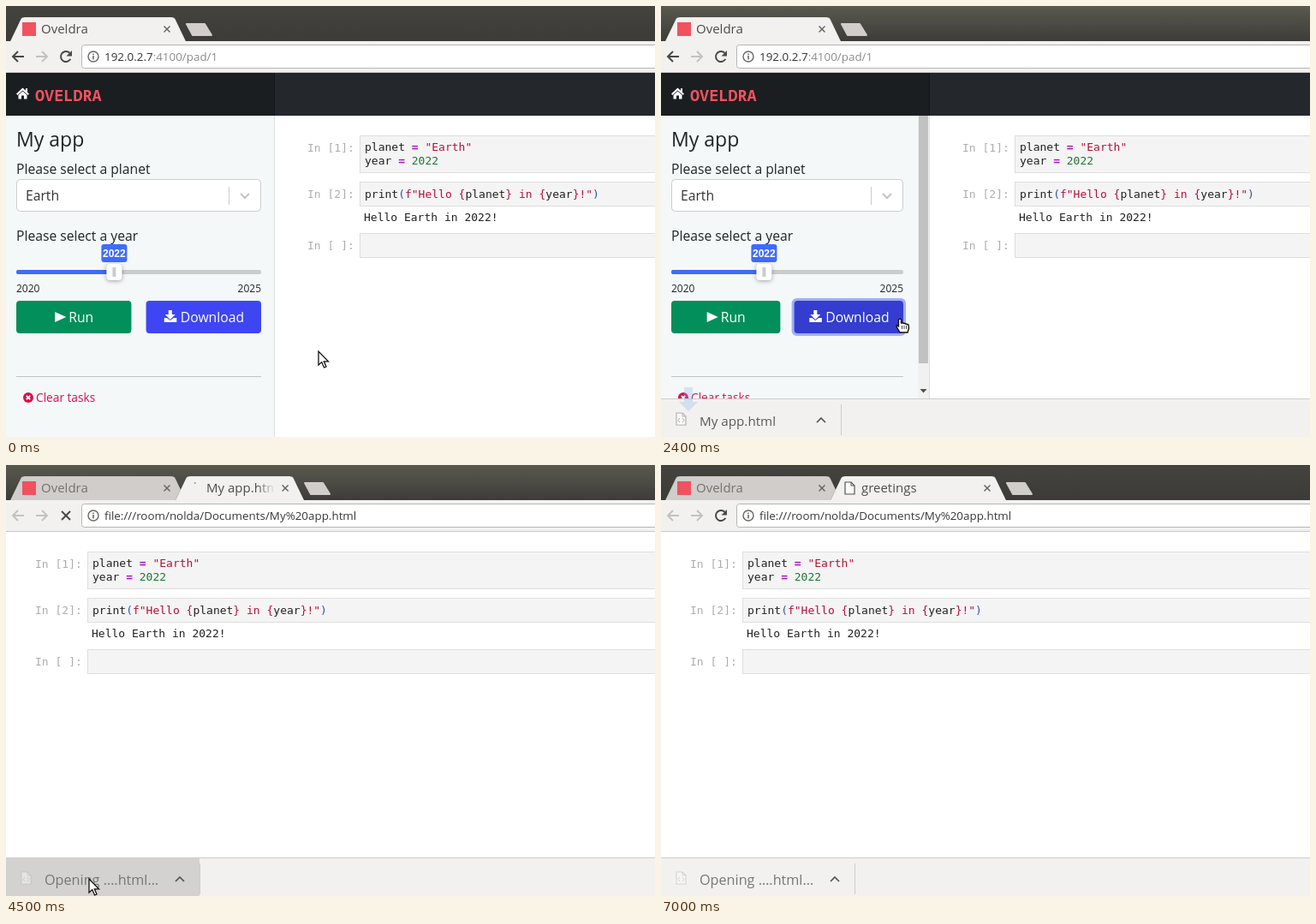
An HTML page with a canvas for the animation above (7.1 s loop, 758 by 503 pixels).

```html
<!DOCTYPE html>
<html lang="en">
<head>
<meta charset="utf-8">
<title>Notebook download</title>
<style>
html, body { margin: 0; width: 100%; height: 100%; overflow: hidden; }
canvas { display: block; }
</style>
</head>
<body>
<canvas id="stage" width="758" height="503"></canvas>
<script>
const c = document.getElementById('stage').getContext('2d');
const W = 758, H = 503, LOOP = 7100;
const SANS = '"Open Sans", "Noto Sans", sans-serif';
const MONO = '"DejaVu Sans Mono", monospace';
const INK = '#212529', BAR = '#f2f1f0', BLUE = '#3f6bfd', RED = '#f0525f';

// Keys are [time, ...values]
const POINTER = [
  [300, 365, 403], [600, 331, 388], [900, 285, 363], [1000, 285, 363], [1100, 279, 365],
  [2400, 279, 365], [3100, 205, 402], [3900, 97, 483], [4700, 97, 483], [5000, 190, 478],
  [5100, 190, 478], [5200, 250, 440], [5400, 339, 350], [5600, 120, 330], [5700, 8, 280],
  [5800, 65, 220], [5900, 60, 137], [6000, 52, 84], [6100, 45, 30]
];
const CHIP_SHADE = [[3900, 0], [4100, .075], [4200, .13], [4500, .13], [4700, 0]];

const clamp = v => Math.max(0, Math.min(1, v));
const easeOut = p => 1 - (1 - clamp(p)) ** 2;
const mix = (a, b, p) => a + (b - a) * p;

function track(keys, t) {
  const i = keys.findIndex(k => k[0] >= t);
  if (i === 0) return keys[0].slice(1);
  if (i < 0) return keys[keys.length - 1].slice(1);
  const [a, b] = [keys[i - 1], keys[i]];
  const p = (t - a[0]) / (b[0] - a[0]);
  return a.slice(1).map((v, j) => mix(v, b[j + 1], p));
}

function rect(x, y, w, h, fill) {
  c.fillStyle = fill;
  c.fillRect(x, y, w, h);
}

function round(x, y, w, h, r, fill, stroke, width = 1) {
  c.beginPath();
  c.roundRect(x, y, w, h, r);
  paint(fill, stroke, width);
}

function circle(x, y, r, fill, stroke, width = 1) {
  c.beginPath();
  c.arc(x, y, r, 0, 7);
  paint(fill, stroke, width);
}

function paint(fill, stroke, width = 1) {
  if (fill) { c.fillStyle = fill; c.fill(); }
  if (stroke) { c.strokeStyle = stroke; c.lineWidth = width; c.stroke(); }
}

function poly(pts, fill, stroke, width = 1, open = false) {
  c.beginPath();
  for (let i = 0; i < pts.length; i += 2) c.lineTo(pts[i], pts[i + 1]);
  if (!open) c.closePath();
  paint(fill, stroke, width);
}

function text(s, x, y, size, color = INK, family = SANS, weight = 400) {
  c.font = `${weight} ${size}px ${family}`;
  c.fillStyle = color;
  c.fillText(s, x, y);
  return x + c.measureText(s).width;
}

function at(x, y, draw) {
  c.save();
  c.translate(x, y);
  draw();
  c.restore();
}

function clip(x, y, w, h, draw) {
  c.save();
  c.beginPath();
  c.rect(x, y, w, h);
  c.clip();
  draw();
  c.restore();
}

function vertical(y0, y1, top, bottom) {
  const g = c.createLinearGradient(0, y0, 0, y1);
  g.addColorStop(0, top);
  g.addColorStop(1, bottom);
  return g;
}

function cross(x, y, r, color, width) {
  poly([x - r, y - r, x + r, y + r], null, color, width, true);
  poly([x - r, y + r, x + r, y - r], null, color, width, true);
}

function page(x, y, color) {
  poly([x, y, x + 7, y, x + 11, y + 4, x + 11, y + 14, x, y + 14], '#fafafa', color, 1.2);
  poly([x + 7, y, x + 7, y + 4, x + 11, y + 4], null, color, 1, true);
}

function tab(x, r, title, fill, color) {
  c.beginPath();
  c.moveTo(x, 41);
  c.lineTo(x + 12, 16);
  c.quadraticCurveTo(x + 13, 13, x + 17, 13);
  c.lineTo(r - 17, 13);
  c.quadraticCurveTo(r - 13, 13, r - 12, 16);
  c.lineTo(r, 41);
  paint(fill, 'rgba(0,0,0,.15)', 1);
  const fade = c.createLinearGradient(r - 55, 0, r - 34, 0);
  fade.addColorStop(0, color);
  fade.addColorStop(1, fill);
  clip(x, 13, Math.max(0, r - x - 34), 28, () => text(title, x + 36, 32, 15, fade));
  cross(r - 22, 27, 3.5, '#666', 1.5);
}

function tabStrip(t, second, my) {
  const lit = t >= 1600 && t < 7000;
  rect(0, 0, W, 41, lit ? vertical(0, 41, '#5a594f', '#3d3c38') : vertical(0, 41, '#44433e', '#3c3b37'));
  const hovered = t >= 6100 && t < 6300;
  tab(5, 210, 'Oveldra', second ? (hovered ? '#dfdddb' : '#d0cdcb') : BAR, second ? '#757370' : '#4c4c4c');
  rect(19, 19, 16, 16, RED);
  let end = 210;
  if (second) {
    end = mix(210, 403, easeOut((t - 4360) / 300));
    const done = t >= 4700;
    tab(198, end, done ? 'greetings' : 'My app.html', BAR, '#4c4c4c');
    if (done) page(215, 20, '#555');
    else {
      c.beginPath();
      c.arc(220, 27, 6, -1.6, -1.3 + (t - 4500) / 120);
      paint(null, '#888', 1.5);
    }
  }
  at(end - 210, 0, () => {
    c.lineJoin = 'round';
    poly([211, 21, 232, 21, 240, 34, 218, 34], '#d0cdcb', '#d0cdcb', 2);
    c.lineJoin = 'miter';
  });
}

function arrowIcon(x, dir, color) {
  poly([x - 7 * dir, 59, x + 6 * dir, 59], null, color, 2, true);
  poly([x, 53, x + 6 * dir, 59, x, 65], null, color, 2, true);
}

function toolbar(t, second) {
  rect(0, 41, W, 37, BAR);
  rect(0, 77, W, 1, '#cbc9c7');
  arrowIcon(14, -1, second ? '#c4c2c0' : '#484848');
  arrowIcon(42, 1, '#c4c2c0');
  if (second && t < 4700) cross(70, 59, 5, '#484848', 2);
  else {
    c.beginPath();
    c.arc(70, 59, 6, .5, 5.5);
    paint(null, '#484848', 2);
    poly([77, 52, 77, 58.5, 70.5, 58.5], '#484848');
  }
  round(88.5, 45.5, 700, 27, 3, '#fff', '#b8b6b3');
  circle(102, 59, 6, null, '#666', 1.4);
  rect(101.2, 58, 1.6, 4.5, '#666');
  rect(101.2, 55.5, 1.6, 1.6, '#666');
  if (second) text('file:///room/nolda/Documents/My%20app.html', 115, 64, 13.4, '#383838');
  else text(':4100/pad/1', text('192.0.2.7', 115, 64, 13.4, '#333'), 64, 13.4, '#8c8c8c');
}

function code(x, y, ...parts) {
  const colors = { k: '#212121', s: '#b3123a', o: '#aa0fce', n: '#1c7a34', b: '#2a55b0' };
  for (const p of parts) x = text(p.slice(1), x, y, 13, colors[p[0]], MONO, p[0] === 'o' ? 700 : 400);
}

function notebook(x, y) {
  at(x, y, () => {
    const cell = (label, top, h, base) => {
      rect(95, top, 700, h, '#dedede');
      rect(96, top + 1, 700, h - 2, '#f4f4f4');
      text(`In [${label}]:`, 34, base, 13, '#adadad', MONO);
    };
    cell('1', 101, 44, 120);
    code(101, 119, 'kplanet ', 'o=', 's "Earth"');
    code(101, 135, 'kyear ', 'o=', 'n 2022');
    cell('2', 155, 29, 174);
    code(101, 174, 'kprint', 'b(', 'sf"Hello {', 'kplanet', 's} in {', 'kyear', 's}!"', 'b)');
    code(100, 201, 'kHello Earth in 2022!');
    cell(' ', 215, 29, 234);
  });
}

function downloadIcon(x, y) {
  poly([x + 5, y, x + 9, y, x + 9, y + 5, x + 13, y + 5, x + 7, y + 11, x + 1, y + 5, x + 5, y + 5], '#fff');
  poly([x, y + 9, x + 3, y + 9, x + 7, y + 12, x + 11, y + 9, x + 14.5, y + 9, x + 14.5, y + 14, x, y + 14], '#fff');
}

function sidebar(t, bottom, over) {
  const scroll = bottom < H;
  const right = scroll ? 283 : 298, w = right - 12;
  rect(0, 128, 313, 375, '#f4f8f9');
  rect(313, 128, 1, 375, '#dcdfe1');
  text('My app', 12, 164, 23, INK, SANS, 500);
  text('Please select a planet', 12, 196, 15.7);
  round(12.5, 202.5, w - 1, 37, 4, '#fff', '#ccc');
  text('Earth', 23, 227, 15.7, '#333');
  rect(right - 38, 211, 1, 21, '#ccc');
  poly([right - 24, 219, right - 19, 224, right - 14, 219], null, '#c4c4c4', 2, true);

  text('Please select a year', 12, 274, 15.7);
  const knob = 12 + w * .4;
  round(12, 308, w, 5, 2, '#ccc');
  round(12, 308, knob - 12, 5, 2, BLUE);
  round(knob - 15, 278, 30, 21, 3, BLUE);
  text('2022', knob - 13.4, 293, 12, '#fff', '"Liberation Sans", sans-serif', 700);
  c.shadowColor = 'rgba(0,0,0,.35)';
  c.shadowBlur = 5;
  c.shadowOffsetY = 1;
  round(knob - 9, 301, 18, 19, 4, '#fff');
  c.shadowColor = 'transparent';
  rect(knob - 2, 305, 4, 11, '#ccc');
  text('2020', 12, 334, 12);
  text('2025', right - 27.4, 334, 12);

  const bw = w * .47, runMid = 12 + bw / 2, loadMid = right - bw / 2;
  round(12, 344, bw, 38, 4, '#038f5b');
  poly([runMid - 22, 357, runMid - 9, 363, runMid - 22, 369], '#fff');
  text('Run', runMid - 6, 369, 15.7, '#fff');
  if (t >= 1700) round(right - bw - 3, 341, bw + 6, 44, 6, '#a0aef7');
  round(right - bw, 344, bw, 38, 4, over || t >= 1600 ? '#343dcf' : '#3e46f4');
  downloadIcon(loadMid - 46, 355);
  text('Download', loadMid - 27, 369, 15.7, '#fff');

  rect(12, 432, w, 1, '#bfc3c5');
  circle(26, 457, 6, '#dc0f4a');
  cross(26, 457, 2.2, '#fff', 1.8);
  text('Clear tasks', 35, 462, 13.7, '#dc0f4a');

  if (scroll) {
    rect(300, 128, 13, bottom - 128, '#f1f1f1');
    rect(301, 128, 11, bottom - 169, '#c1c1c1');
    poly([302.5, bottom - 11, 310.5, bottom - 11, 306.5, bottom - 6.5], '#505050');
  }
}

function header() {
  rect(0, 78, W, 50, '#24282d');
  rect(0, 78, 313, 50, '#1b1e21');
  rect(313, 78, 1, 50, '#15171a');
  poly([12, 102.5, 19.5, 95.5, 27, 102.5, 25.5, 104, 19.5, 98.5, 13.5, 104], '#fff');
  rect(23, 96, 2, 4, '#fff');
  poly([14.5, 104, 19.5, 99.5, 24.5, 104, 24.5, 108.5, 21, 108.5, 21, 104.5, 18, 104.5, 18, 108.5, 14.5, 108.5], '#fff');
  text('OVELDRA', 34, 110.5, 18.5, RED, '"Noto Sans Mono", monospace', 700);
}

function shelf(t, top) {
  rect(0, top, W, 45, BAR);
  rect(0, top, W, 1, '#d0cecc');
  const w = Math.round(226 * easeOut((t - 1800) / 820));
  const opening = t >= 4300;
  clip(0, top + 1, w + 1, 45, () => at(0, top - 458, () => {
    const [shade] = track(CHIP_SHADE, t);
    rect(0, 459, w, 44, `rgba(0,0,0,${shade})`);
    rect(w, 465, 1, 36, '#cfcdcb');
    if (t > 2400 && t < 4440) {
      c.globalAlpha = .5 - .5 * Math.cos((t - 2400) / 680 * 2 * Math.PI);
      circle(25, 483, 12.5, 'rgba(0,0,0,.06)', '#ee7350', 1.6);
    }
    c.globalAlpha = opening ? .45 : 1;
    page(18, 475, '#b4b2b0');
    poly([22, 481, 20, 483.5, 22, 486], null, '#aaa', 1, true);
    poly([25, 481, 27, 483.5, 25, 486], null, '#aaa', 1, true);
    c.globalAlpha = 1;
    if (opening) text('Opening ….html…', 45, 490, 16.2, '#777');
    else text('My app.html', 45, 490, 15.2, '#5a5a5a');
    poly([w - 28, 486, w - 23, 481, w - 18, 486], null, '#555', 1.7, true);
  }));
}

// Blue arrow that sinks into the shelf when a download begins
function startArrow(t) {
  const p = (t - 1800) / 650;
  if (p <= 0 || p >= 1) return;
  c.globalAlpha = 1 - (2 * p - 1) ** 2;
  at(32, 476 - 40 * (1 - p), () =>
    poly([-5, -28, 5, -28, 5, -11, 11, -11, 0, 0, -11, -11, -5, -11], '#7fb0ee'));
  c.globalAlpha = 1;
}

function pointer(x, y, hand) {
  at(x, y, () => {
    if (!hand) {
      poly([0, 0, 0, 16, 3.7, 12.6, 6.5, 19, 9, 18, 6.3, 11.8, 11.5, 11.8], '#fff', '#111', 1.3);
      return;
    }
    c.lineJoin = 'round';
    poly([-1.5, 1, 0, 0, 1.5, 1, 1.5, 5, 4, 5, 7, 6, 10, 7, 10.5, 11, 9, 16, 0, 16, -4, 9, -3.5, 7.5, -1.5, 9],
      '#fff', '#111', 1.4);
    for (const fx of [2, 4.5, 7]) rect(fx, 8, 1, 4, '#444');
    c.lineJoin = 'miter';
  });
}

function draw(t) {
  const [mx, my] = track(POINTER, t);
  const second = t >= 4400;
  const top = Math.round(mix(H, 458, easeOut((t - 1700) / 200)));
  const over = t < 3200 && mx > 157 && mx < 298 && my > 344 && my < 382;
  rect(0, 0, W, H, '#fff');
  clip(0, 78, W, top - 78, () => {
    if (second) notebook(0, 0);
    else {
      notebook(318, 50);
      sidebar(t, top, over);
      header();
    }
  });
  tabStrip(t, second);
  toolbar(t, second);
  if (top < H) shelf(t, top);
  startArrow(t);
  if (t >= 4000 && t < 4300) rect(108, 499, 101, 4, '#111');
  if (t < 6200) pointer(mx, my, over);
}

const start = performance.now();
function tick(now) {
  const t = Math.max(0, now - start) % LOOP;
  draw(Math.floor(t / 100) * 100);
  requestAnimationFrame(tick);
}
draw(0);
requestAnimationFrame(tick);
</script>
</body>
</html>
```
